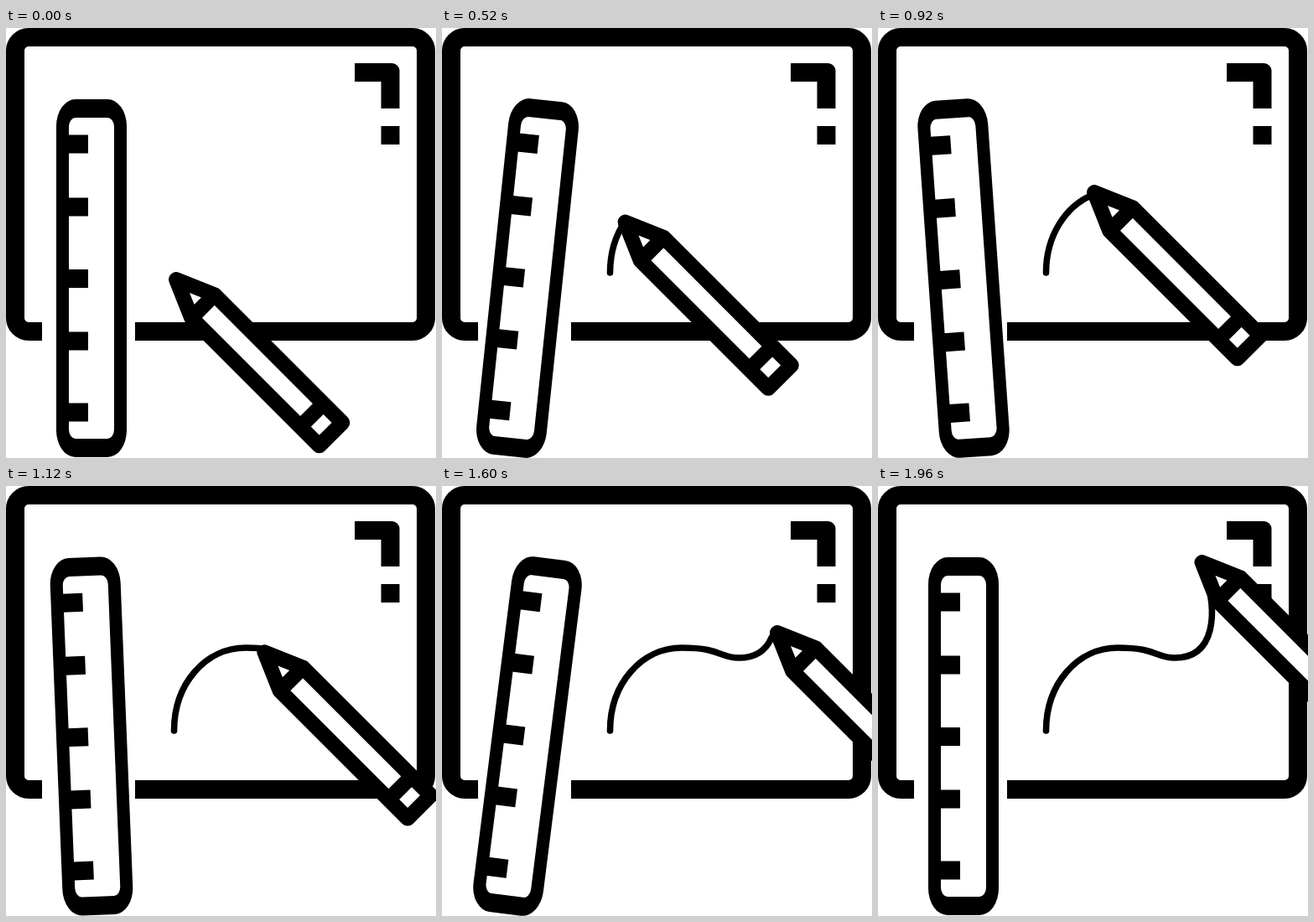
Animation of 513 by 513 pixels, one loop 2 s. Source, as an HTML page with a canvas:

```html
<!DOCTYPE html>
<html lang="en">
<head>
<meta charset="utf-8">
<title>Ruler and pencil</title>
<style>
  html, body { margin: 0; width: 100%; height: 100%; overflow: hidden; background: #fff; }
  canvas { display: block; width: 513px; height: 513px; }
</style>
</head>
<body>
<canvas id="stage" width="513" height="513"></canvas>
<script>
const ctx = document.getElementById('stage').getContext('2d');
const LOOP = 2000, STEP = 40, FPS = 24;

// Motion keys, timed in ticks of 1/24 s.
const swing = [[0, 0], [12, 6], [24, -6], [36, 8.8], [47, 0]];
const tipKeys = [
  [0, 203, 300], [5, 207, 271], [12, 218.5, 231.5], [22, 258, 196],
  [25, 284, 192], [31, 356, 209], [38, 400, 175], [47, 386.5, 91]
];
const curve = new Path2D(
  'M200.5 292C200.5 236 238 193 286 193S330 205 354 205S391 192 396 172S398 125 387 96');

function segment(keys, t) {
  const i = keys.findIndex(k => t <= k[0]);
  return i < 0 ? keys.length - 1 : Math.max(1, i);
}

function angleAt(t) {
  const i = segment(swing, t);
  const [t0, a] = swing[i - 1], [t1, b] = swing[i];
  return a + (b - a) * Math.min(1, (t - t0) / (t1 - t0));
}

// Smooth spline through the keys, with slopes taken from the neighbours.
function tipAt(t) {
  const i = segment(tipKeys, t), a = tipKeys[i - 1], b = tipKeys[i];
  const before = tipKeys[i - 2] || a, after = tipKeys[i + 1] || b;
  const d = b[0] - a[0], u = Math.min(1, (t - a[0]) / d), v = 1 - u;
  return [1, 2].map(k => {
    const m0 = (b[k] - before[k]) / (b[0] - before[0]) * d;
    const m1 = (after[k] - a[k]) / (after[0] - a[0]) * d;
    return a[k] * v * v * (1 + 2 * u) + b[k] * u * u * (1 + 2 * v)
         + m0 * u * v * v - m1 * u * u * v;
  });
}

function travelled(t) {
  let sum = 0, [x, y] = tipAt(0);
  for (let s = 1; s <= t; s++) {
    const [nx, ny] = tipAt(s);
    sum += Math.hypot(nx - x, ny - y);
    [x, y] = [nx, ny];
  }
  return sum;
}

function drawBoard() {
  const l = 11, t = 11, r = 501, b = 362, rad = 16;
  ctx.lineWidth = 22;
  ctx.beginPath();
  ctx.moveTo(43, b);
  ctx.arcTo(l, b, l, t, rad);
  ctx.arcTo(l, t, r, t, rad);
  ctx.arcTo(r, t, r, b, rad);
  ctx.arcTo(r, b, l, b, rad);
  ctx.lineTo(154, b);
  ctx.stroke();

  ctx.beginPath();
  ctx.roundRect(416, 42, 53.5, 22, [0, 9, 0, 0]);
  ctx.rect(447.5, 60, 22, 36);
  ctx.rect(447.5, 117, 22, 22);
  ctx.fill();
}

function drawRuler(angle) {
  const cx = 102, cy = 298.5;
  ctx.save();
  ctx.translate(cx, cy);
  ctx.rotate(angle * Math.PI / 180);
  ctx.translate(-cx, -cy);
  ctx.beginPath();
  ctx.roundRect(60, 85, 84, 427, { x: 23, y: 32 });
  ctx.roundRect(75, 107, 54, 383, { x: 8, y: 11 });
  ctx.fill('evenodd');
  for (const y of [127.5, 202.5, 288, 362.5, 447.5]) ctx.fillRect(74, y, 24, 22);
  ctx.restore();
}

function drawCurve(length) {
  if (length <= 0) return;
  ctx.save();
  ctx.lineWidth = 7.6;
  ctx.lineCap = 'round';
  ctx.setLineDash([length, 1000]);
  ctx.stroke(curve);
  ctx.restore();
}

// Drawn along the x axis from its tip, then turned by 45 degrees.
function drawPencil([x, y]) {
  const half = 19.5, neck = 45.3, band = 229, end = 261;
  ctx.save();
  ctx.translate(x, y);
  ctx.rotate(Math.PI / 4);
  ctx.lineWidth = 18;
  ctx.lineJoin = 'round';
  ctx.beginPath();
  ctx.moveTo(0, 0);
  ctx.lineTo(neck, -half);
  ctx.lineTo(end, -half);
  ctx.lineTo(end, half);
  ctx.lineTo(neck, half);
  ctx.closePath();
  ctx.fillStyle = '#fff';
  ctx.fill();
  for (const at of [neck, band]) {
    ctx.moveTo(at, -half);
    ctx.lineTo(at, half);
  }
  ctx.stroke();
  ctx.restore();
}

function draw(now) {
  const shown = Math.floor((now % LOOP) / STEP) * STEP;
  const t = Math.round(shown * FPS / 1000);
  ctx.fillStyle = '#fff';
  ctx.fillRect(0, 0, 513, 513);
  ctx.fillStyle = ctx.strokeStyle = '#000';
  drawBoard();
  drawRuler(angleAt(t));
  drawCurve(travelled(t) * 0.93);
  drawPencil(tipAt(t));
}

const start = performance.now();
function tick() {
  draw(performance.now() - start);
  requestAnimationFrame(tick);
}
tick();
</script>
</body>
</html>
```
